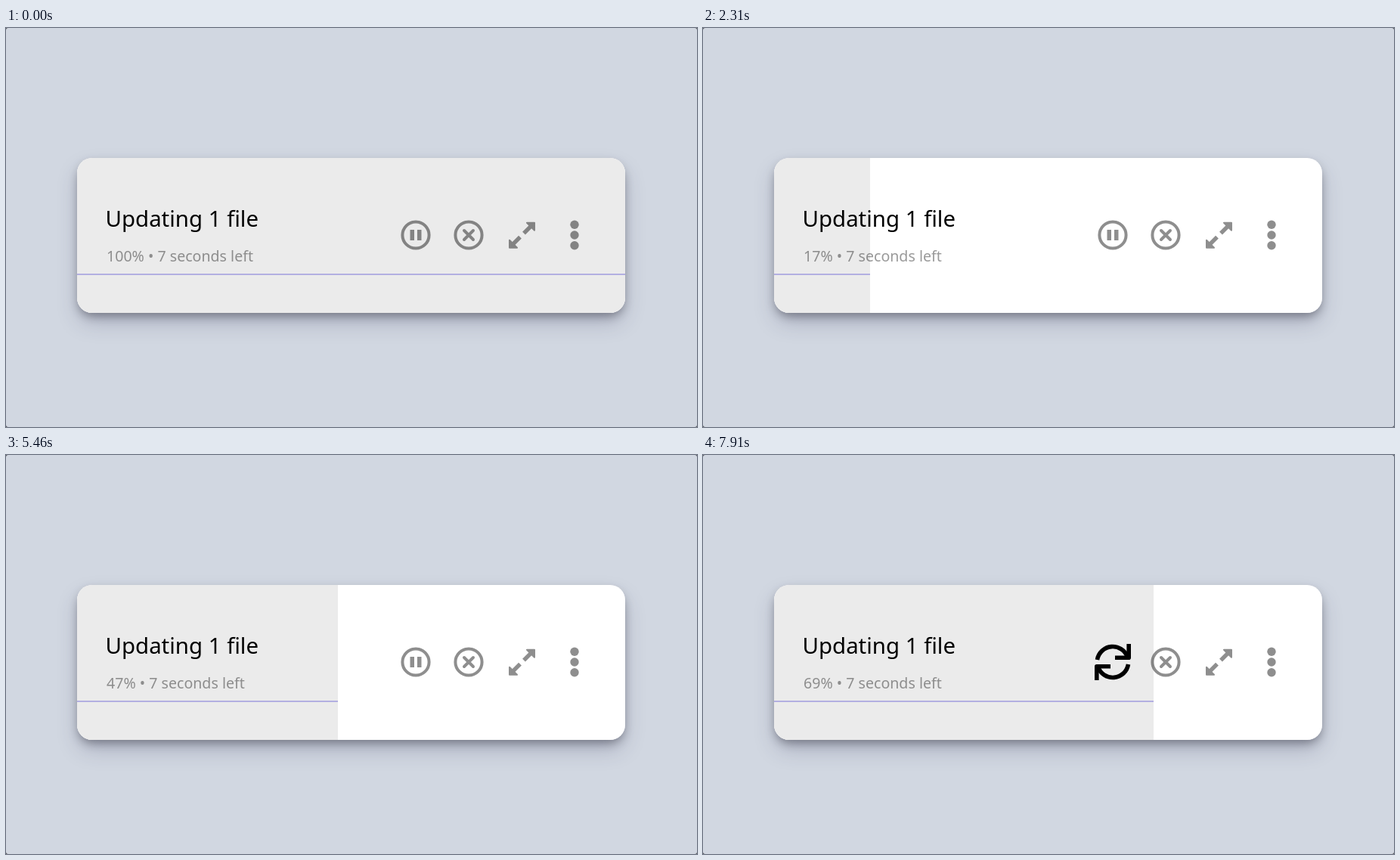
Write an HTML page that moves like this. It is 914 by 528 pixels and loops after 8 s.

```html
<!DOCTYPE html>
<html lang="en">
<head>
<meta charset="utf-8">
<title>Update progress</title>
<style>
  html, body { margin: 0; width: 100%; height: 100%; overflow: hidden; background: #4a4c52; }
  #stage { position: relative; width: 914px; height: 528px; border-radius: 3px; background: #d1d7e1; }
  #card {
    position: absolute; left: 94px; top: 172px; width: 725px; height: 205px;
    border-radius: 20px; overflow: hidden; background: #fff;
  }
  #shadow {
    position: absolute; left: 94px; top: 172px; width: 725px; height: 205px; border-radius: 20px;
    box-shadow: 0 14px 28px -2px rgba(50, 50, 93, .25), 0 6px 14px -3px rgba(0, 0, 0, .4);
  }
  #bar { height: 100%; background: #ebebeb; position: relative; }
  #bar::after {
    content: ""; position: absolute; left: 0; top: 153px; width: 100%; height: 2px; background: #b3afe1;
  }
  svg { position: absolute; left: 0; top: 0; }
  text { font-family: "Noto Sans", "Open Sans", sans-serif; }
  .icon { opacity: .44; }
  .line { fill: none; stroke: #000; stroke-width: 4; }
</style>
</head>
<body>
<div id="stage">
  <div id="shadow"></div>
  <div id="card"><div id="bar"></div></div>
  <svg width="914" height="528" viewBox="0 0 914 528">
    <text x="131.5" y="263" font-size="29.4">Updating 1 file</text>
    <text id="status" x="133" y="309" font-size="19.6" fill-opacity=".4"></text>

    <g id="pause" class="icon" transform="translate(542 274)">
      <circle r="17.6" class="line"/>
      <path d="M-7.5-7h5.5v14h-5.5zM2-7h5.5v14H2z"/>
    </g>
    <g id="refresh" transform="translate(542 274)">
      <g id="arrow" class="line" stroke-linejoin="round" style="stroke-width:5.6">
        <path d="M-20.5-3A20.7 20.7 0 0 1 19.5-6.5"/>
        <path d="M21.2-24V-5.8H3"/>
      </g>
      <use href="#arrow" transform="rotate(180)"/>
    </g>
    <g class="icon" transform="translate(612 274)">
      <circle r="17.6" class="line"/>
      <path class="line" stroke-linecap="round" d="M-6-6L6 6M6-6L-6 6"/>
    </g>
    <g class="icon" transform="translate(682.5 274.2)">
      <g id="half">
        <path class="line" style="stroke-width:5.4" d="M2.5-2.5L13-13"/>
        <path stroke="#000" stroke-width="2" stroke-linejoin="round" d="M6.5-16.5H16.5V-6.5z"/>
      </g>
      <use href="#half" transform="rotate(180)"/>
    </g>
    <g class="icon" transform="translate(752 274)">
      <circle cy="-13.8" r="5.7"/><circle r="5.7"/><circle cy="13.8" r="5.7"/>
    </g>
  </svg>
</div>
<script>
  const LOOP = 8000, STEP = 70, START = 420, LAST = 7910, ICON_SWAP = 7140, FULL = 725;
  // [time in ms, bar width in px]
  const path = [[START, 0], [1540, 74], [3150, 184], [4480, 277], [5460, 345], [6300, 401], [LAST, 502]];
  const $ = id => document.getElementById(id);

  function barWidth(t) {
    if (t < START) return FULL;
    const i = Math.max(1, path.findIndex(([time]) => time >= t));
    const [t0, w0] = path[i - 1], [t1, w1] = path[i];
    return Math.round(w0 + (w1 - w0) * (t - t0) / (t1 - t0));
  }

  function draw(now) {
    const t = Math.min(LAST, Math.floor(now % LOOP / STEP) * STEP);
    const width = barWidth(t), swapped = t >= ICON_SWAP;
    $("bar").style.width = width + "px";
    $("status").textContent = `${Math.floor(width / FULL * 100)}% • 7 seconds left`;
    $("pause").style.display = swapped ? "none" : "";
    $("refresh").style.display = swapped ? "" : "none";
  }

  let start;
  function tick(now) {
    start ??= now;
    draw(now - start);
    requestAnimationFrame(tick);
  }
  draw(0);
  requestAnimationFrame(tick);
</script>
</body>
</html>
```
